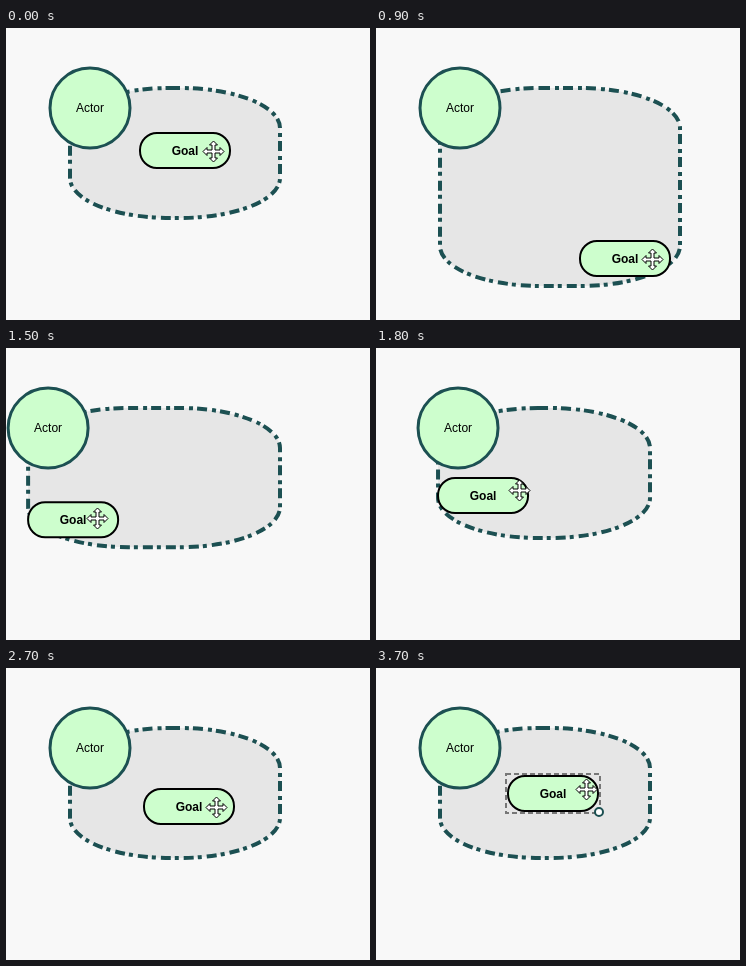
An HTML page for the animation above (3.8 s loop, 364 by 292 pixels).

```html
<!DOCTYPE html>
<html lang="en">
<head>
<meta charset="utf-8">
<title>Resizing actor boundary</title>
<style>
  html, body { margin: 0; width: 100%; height: 100%; overflow: hidden; background: #f8f8f8; }
  svg { display: block; }
  text { font: 12px "Liberation Sans", Arial, sans-serif; text-anchor: middle; }
  .strong { font-weight: bold; }
  .teal { stroke: #1c5052; }
  .green { fill: #cdfecd; }
</style>
</head>
<body>
<svg width="364" height="292" viewBox="0 0 364 292">
  <rect id="boundary" class="teal" rx="100" ry="40" fill="#e6e6e6" stroke-width="4" stroke-dasharray="10 5 4 4"/>
  <g id="actor">
    <circle class="teal green" r="40" stroke-width="3"/>
    <text y="4">Actor</text>
  </g>
  <g id="goal">
    <rect class="green" x="-45" y="-17.5" width="90" height="35" rx="17" stroke="#000" stroke-width="2"/>
    <text class="strong" y="4.5">Goal</text>
    <g id="selection">
      <rect x="-47" y="-19.5" width="94" height="39" fill="none" stroke="#777" stroke-width="2" stroke-dasharray="5 3"/>
      <circle class="teal" cx="46" cy="18.5" r="4" fill="#fff" stroke-width="2"/>
    </g>
  </g>
  <path id="cursor" fill="#fff" stroke="#000" d="M0-10.5 4-6.5H1.5V-1.5H6.5V-4L10.5 0 6.5 4V1.5H1.5V6.5H4L0 10.5-4 6.5H-1.5V1.5H-6.5V4L-10.5 0-6.5-4V-1.5H-1.5V-6.5H-4Z"/>
</svg>
<script>
const LOOP = 3800, STEP = 100;
const POINTER_LEAD = 0.2; // the dragged goal trails the pointer, in steps
const START = [179, 122.5];

// Each drag is an eased quadratic curve; times are in steps
const DRAGS = [
  { from: 0, until: 3, bend: [218, 126], to: [255.5, 130] },
  { from: 6, until: 9, bend: [258, 185], to: [249, 230.5] },
  { from: 10, until: 16, bend: [123, 205], to: [57, 166] },
  { from: 16, until: 21, bend: [126.5, 159], to: [205, 42.5] },
  { from: 23, until: 27, bend: [192, 80], to: [183, 138.5] },
  { from: 27, until: 31, bend: [187, 158], to: [177, 125.5] }
];

const byId = id => document.getElementById(id);
const boundary = byId("boundary"), actor = byId("actor"), goal = byId("goal");
const selection = byId("selection"), cursor = byId("cursor");

const clamp = k => Math.min(1, Math.max(0, k));
const ease = k => k * k * (3 - 2 * k);
const mix = (a, b, k) => a + (b - a) * k;

function goalAt(step) {
  return DRAGS.reduce((point, { from, until, bend, to }) => {
    const k = ease(clamp((step - from) / (until - from)));
    return point.map((v, i) => mix(mix(v, bend[i], k), mix(bend[i], to[i], k), k));
  }, START);
}

function place(node, x, y) {
  node.setAttribute("transform", `translate(${x} ${y})`);
}

function draw(step) {
  const [x, y] = goalAt(step);
  const left = Math.min(64, x - 45), right = Math.max(274, x + 55);
  const top = Math.min(60, y - 17.5), bottom = Math.max(190, y + 27.5);
  const box = { x: left, y: top, width: right - left, height: bottom - top };
  for (const name in box) boundary.setAttribute(name, box[name]);

  place(actor, left + 20, top + 20);
  place(goal, x, y);
  selection.style.display = step >= 35 ? "" : "none";

  const [px, py] = goalAt(step + POINTER_LEAD);
  const [dx, dy] = step >= 37 ? [6, -5] : [0, 0]; // released pointer moves off
  place(cursor, Math.round(px + 27) + 0.5 + dx, Math.round(py + 0.5) + 0.5 + dy);
}

function tick() {
  draw(Math.floor(performance.now() % LOOP / STEP));
  requestAnimationFrame(tick);
}
tick();
</script>
</body>
</html>
```
